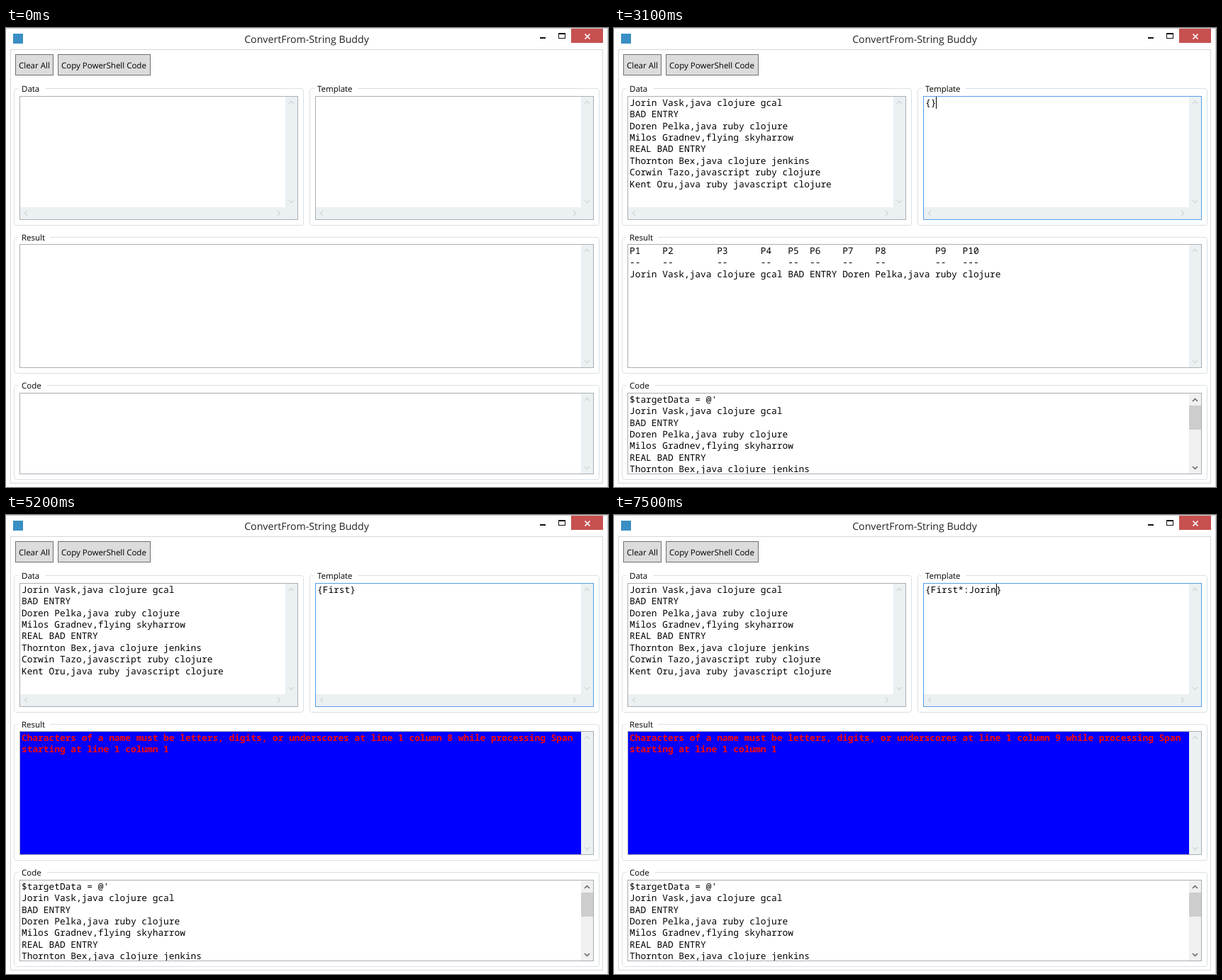
Animation, 849 px wide and 648 px high, one loop 8000 ms. Source, as an HTML page:

```html
<!DOCTYPE html>
<html lang="en">
<head>
<meta charset="utf-8">
<title>ConvertFrom-String Buddy</title>
<style>
  html, body { margin: 0; width: 100%; height: 100%; overflow: hidden; background: #fff; }
  svg { display: block; }
  text { white-space: pre; text-rendering: geometricPrecision; }
  .ui { font: 11.5px "Open Sans", "Noto Sans", sans-serif; }
  .title { font: 14.16px "Open Sans", "Noto Sans", sans-serif; fill: #222; text-anchor: middle; }
  .mono { font: 12.83px "Noto Sans Mono", "DejaVu Sans Mono", monospace; }
  .error { font-weight: 700; fill: #f00; }
</style>
</head>
<body>
<script>
const NS = 'http://www.w3.org/2000/svg';
const LOOP = 8000, CHAR = 7.7, LINE = 16.4;
const GREY = '#abadb3', HOVER = '#7eb4ea', FOCUS = '#569de5';

function add(parent, tag, attrs = {}, content) {
  const node = document.createElementNS(NS, tag);
  for (const key in attrs) node.setAttribute(key, attrs[key]);
  if (content !== undefined) node.textContent = content;
  parent.append(node);
  return node;
}

const svg = add(document.body, 'svg', { width: 849, height: 648, viewBox: '0 0 849 648' });

const fill = (x, y, width, height, color, parent = svg) =>
  add(parent, 'rect', { x, y, width, height, fill: color });

// One-pixel outline covering the pixels from (x, y) up to (right, bottom).
const outline = (x, y, right, bottom, stroke, more = {}) =>
  add(svg, 'rect', { x: x + .5, y: y + .5, width: right - x - 1, height: bottom - y - 1, fill: 'none', stroke, ...more });

const label = (x, y, words, cls = 'ui') => add(svg, 'text', { x, y, class: cls }, words);

function writeLines(parent, x, top, lines, cls = 'mono') {
  lines.forEach((line, i) =>
    add(parent, 'text', { x, y: Math.round(top + 12.8 + i * LINE), class: cls }, line));
}

function chevron(x, y, angle, stroke, parent = svg) {
  add(parent, 'path', {
    d: 'M-3.5 2L0-1.5L3.5 2', fill: 'none', stroke, 'stroke-width': 1.5,
    transform: `translate(${x} ${y}) rotate(${angle})`
  });
}

function scrollBars(x, y, right, bottom, horizontal) {
  const track = '#ebf0f2', arrow = '#d3d8db';
  const end = horizontal ? bottom - 18 : bottom - 1;
  fill(right - 18, y + 1, 17, bottom - y - 2, track);
  chevron(right - 9.5, y + 9, 0, arrow);
  chevron(right - 9.5, end - 8, 180, arrow);
  if (!horizontal) return;
  fill(x + 1, end, right - x - 2, 17, track);
  chevron(x + 9, end + 8.5, -90, arrow);
  chevron(right - 27, end + 8.5, 90, arrow);
}

// Titled group with a text box; returns the content layer and the box border.
function panel(name, gx, gy, gRight, gBottom, gap, top, bottom, horizontal) {
  outline(gx, gy, gRight, gBottom, '#d8e0e5', { rx: 3 });
  fill(gx + 6, gy, gap, 1, '#fff');
  label(gx + 11, gy + 5, name);
  const x = gx + 8, right = gRight - 8;
  scrollBars(x, top, right, bottom, horizontal);
  const clip = add(svg, 'clipPath', { id: 'clip' + name });
  fill(x + 1, top + 1, right - x - 2, bottom - top - 2, '#000', clip);
  const body = add(svg, 'g', { 'clip-path': `url(#clip${name})` });
  return { body, border: outline(x, top, right, bottom, GREY) };
}

function button(x, right, words) {
  fill(x, 37, right - x, 30, '#dddcdd');
  outline(x, 37, right, 67, '#707070');
  label(x + 5, 57, words);
}

// Window frame and title bar
fill(0, 0, 849, 648, '#fff');
fill(0, 0, 849, 1, '#c8cdd0');
fill(848, 0, 1, 648, '#c8cdd0');
outline(6, 30, 842, 643, '#d7d7d9');
fill(10, 8, 14, 14, '#3a8fc4');
label(424, 21, 'ConvertFrom-String Buddy', 'title');
fill(753, 13, 8, 2, '#111');
outline(779, 7, 789, 15, '#111');
fill(779, 7, 10, 2, '#111');
fill(797, 1, 45, 20, '#c75050');
add(svg, 'path', { d: 'M816.5 8.5l7 7m0-7l-7 7', stroke: '#fff', 'stroke-width': 1.7 });
button(13, 67, 'Clear All');
button(73, 204, 'Copy PowerShell Code');

const data = panel('Data', 11, 85, 420, 279, 38, 96, 271, true);
const template = panel('Template', 428, 85, 837, 279, 62, 96, 271, true);
const result = panel('Result', 11, 295, 837, 488, 45, 305, 480);
const code = panel('Code', 11, 504, 837, 638, 40, 515, 630);

const records = [
  'Jorin Vask,java clojure gcal',
  'BAD ENTRY',
  'Doren Pelka,java ruby clojure',
  'Milos Gradnev,flying skyharrow',
  'REAL BAD ENTRY',
  'Thornton Bex,java clojure jenkins',
  'Corwin Tazo,javascript ruby clojure',
  'Kent Oru,java ruby javascript clojure'
];

const dataText = add(data.body, 'g');
writeLines(dataText, 22, 97, records);

// Result table: the first three records split at spaces
const words = records.slice(0, 3).join(' ').split(' ');
const row = make => words.map((w, i) => make('P' + (i + 1)).padEnd(w.length)).join(' ');
const table = add(result.body, 'g');
writeLines(table, 22, 306, [row(h => h), row(h => '-'.repeat(h.length)), words.join(' ')]);

function errorView(lines) {
  const view = add(result.body, 'g');
  fill(20, 306, 791, 173, '#00f', view);
  writeLines(view, 22, 306, lines, 'mono error');
  return view;
}
const badName = column => errorView([
  `Characters of a name must be letters, digits, or underscores at line 1 column ${column} while processing Span`,
  'starting at line 1 column 1'
]);
const views = {
  table,
  missing: errorView(['Missing Span name at line 1 column 3 while processing Span starting at line 1 column 1']),
  bad8: badName(8),
  bad9: badName(9)
};

const codeView = add(code.body, 'g');
writeLines(codeView, 22, 516, ["$targetData = @'", ...records.slice(0, 6)]);
fill(811, 516, 17, 113, '#f0f0f0', codeView);
fill(811, 533, 17, 34, '#cdcdcd', codeView);
chevron(819.5, 525, 0, '#606060', codeView);
chevron(819.5, 621, 180, '#606060', codeView);

const typed = add(template.body, 'text', { x: 439, y: 110, class: 'mono' });
const caret = fill(0, 97, 1, 17, '#000');

// Each step changes only the listed fields. caret: [box origin, characters before it]
const at = n => [439, n];
const type = (time, text, more) => [time, { text, caret: at(text.length - 1), ...more }];
const steps = [
  [0, { data: GREY, template: GREY, pasted: false, view: '', text: '', caret: null }],
  [600, { data: HOVER }],
  [700, { data: FOCUS, caret: [22, 0] }],
  [1200, { caret: null }],
  [1300, { pasted: true, template: HOVER }],
  [1900, { data: GREY, template: FOCUS, view: 'table', caret: at(0) }],
  [2400, { caret: null }],
  [2900, { caret: at(0) }],
  [3100, { text: '{}', caret: at(2) }],
  [3600, { view: 'missing', caret: null }],
  [3700, { caret: at(1) }],
  type(4200, '{F}'),
  type(4500, '{Fi}'),
  type(4600, '{Fir}'),
  type(4700, '{First}'),
  [5200, { view: 'bad8', caret: null }],
  type(5700, '{First*}'),
  [6200, { view: 'bad9', caret: null }],
  type(6300, '{First*:}'),
  type(6500, '{First*:J}'),
  type(6800, '{First*:Jo}'),
  type(7200, '{First*:Jor}'),
  type(7300, '{First*:Jori}'),
  type(7500, '{First*:Jorin}')
];

const show = (node, on) => node.setAttribute('visibility', on ? 'visible' : 'hidden');

function render(time) {
  const state = Object.assign({}, ...steps.filter(s => s[0] <= time).map(s => s[1]));
  data.border.setAttribute('stroke', state.data);
  template.border.setAttribute('stroke', state.template);
  show(dataText, state.pasted);
  show(codeView, state.view);
  for (const key in views) show(views[key], key === state.view);
  typed.textContent = state.text;
  show(caret, state.caret);
  if (state.caret) caret.setAttribute('x', Math.floor(state.caret[0] + state.caret[1] * CHAR));
}

const start = performance.now();
function tick() {
  render((performance.now() - start) % LOOP);
  requestAnimationFrame(tick);
}
tick();
</script>
</body>
</html>
```
